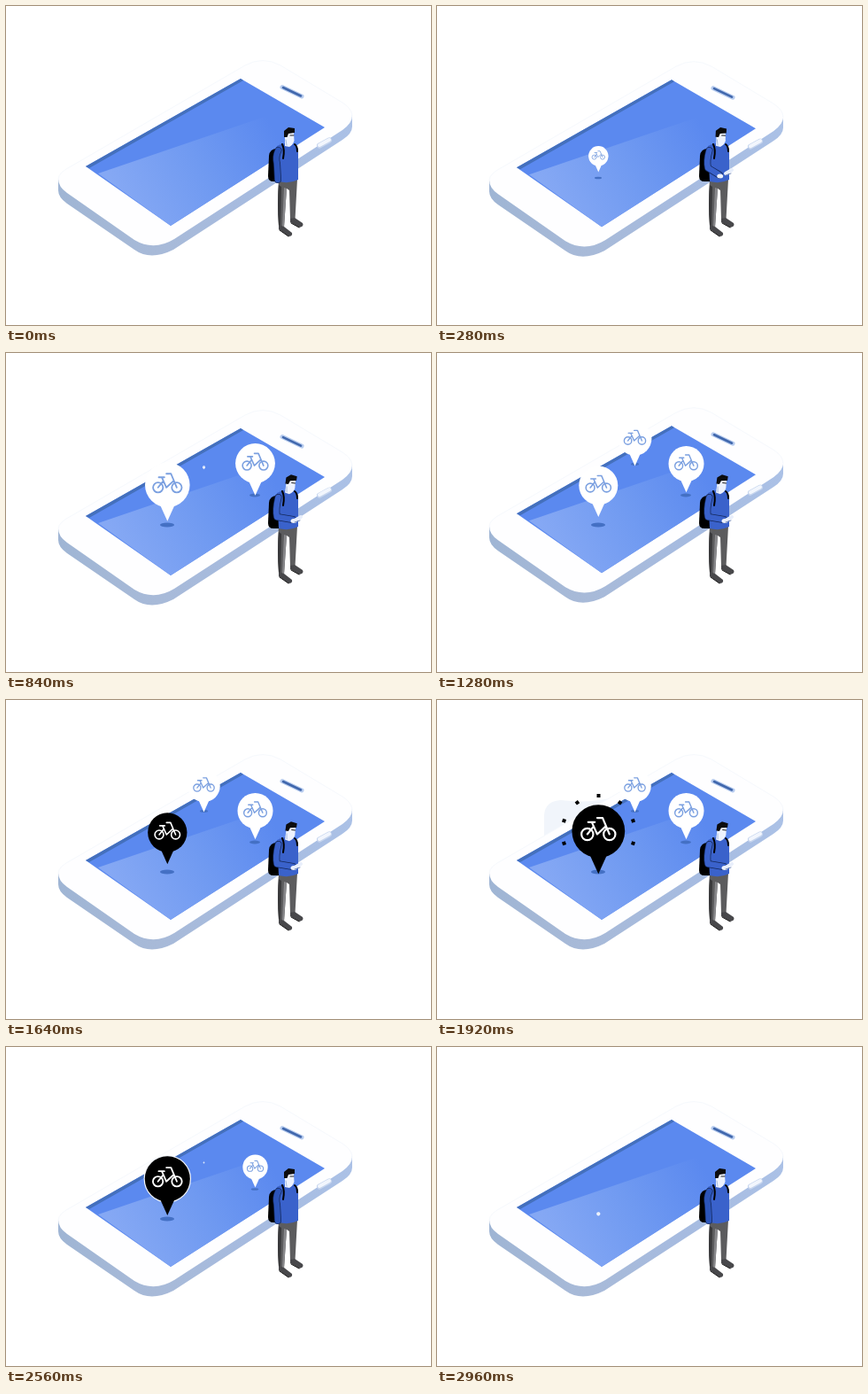
An HTML page with a canvas for the animation above (3 s loop, 480 by 360 pixels).

```html
<!DOCTYPE html>
<html lang="en">
<head>
<meta charset="utf-8">
<title>Bike finder</title>
<style>
html, body { margin: 0; width: 480px; height: 360px; overflow: hidden; background: #fff; }
canvas { display: block; }
</style>
</head>
<body>
<canvas id="stage" width="480" height="360"></canvas>
<script>
const g = document.getElementById('stage').getContext('2d');
const LOOP = 3000;

// Eased value at time t from [time, value] keys.
function key(t, keys) {
  if (t <= keys[0][0]) return keys[0][1];
  for (let i = 1; i < keys.length; i++) {
    const [t0, a] = keys[i - 1], [t1, b] = keys[i];
    if (t < t1) {
      const x = (t - t0) / (t1 - t0);
      return a + (b - a) * x * x * (3 - 2 * x);
    }
  }
  return keys[keys.length - 1][1];
}

function fill(d, color) {
  g.fillStyle = color;
  g.fill(new Path2D(d));
}

function line(d, color, width) {
  g.strokeStyle = color;
  g.lineWidth = width;
  g.stroke(new Path2D(d));
}

function ellipse(x, y, rx, ry, color) {
  g.beginPath();
  g.ellipse(x, y, rx, ry, 0, 0, 7);
  g.fillStyle = color;
  g.fill();
}

function gradient(x0, y0, x1, y1, ...colors) {
  const grad = g.createLinearGradient(x0, y0, x1, y1);
  colors.forEach((c, i) => grad.addColorStop(i / (colors.length - 1), c));
  return grad;
}

function phone(bob) {
  g.save();
  g.translate(0, bob);
  fill('M59 195V208Q59 216 69 223L145 275Q163 288 189 275L380 151Q391 144 391 136V123Z',
    gradient(59, 0, 391, 0, '#9fb5d4', '#a8bad8', '#a6bbe0', '#abc1e6'));
  const face = 'M59 195Q59 188 75 180L270 67Q290 56 310 67L380 109Q402 124 380 140L190 263Q167 277 145 264L69 211Q59 204 59 195Z';
  fill(face, '#fefeff');
  line('M59 195Q59 188 75 180L270 67Q290 56 310 67L380 109Q391 116 391 124', '#f6f9fd', 1);
  fill('M90 181L265 82L360 137L186 248Z', '#5b89ef');
  fill('M104 189L292 125L330 156L186 248Z',
    gradient(135, 225, 300, 135, '#85a8f4', '#709af1', '#5b89ef'));
  fill('M90 181L265 82L268 84L94 183Z', '#4470bd');
  line('M312 91.5L334 102', '#b9cdef', 5);
  line('M313 92L333 101.5', '#4168ad', 2.6);
  line('M354 157.5L365 151.5', '#c6d5ee', 6);
  line('M354 157L365 151', '#f2f6fd', 4);
  g.restore();
}

function bike(color) {
  g.strokeStyle = color;
  g.lineWidth = 1.6;
  for (const x of [-9.2, 9.2]) {
    g.beginPath();
    g.arc(x, 2.5, 4.9, 0, 7);
    g.stroke();
  }
  line('M-9.2 2.5L-4 -4M-5.5 -7.5L-1 2.5L6 -4M-8.5 -7.5H-3M9.2 2.5L3.5 -11H-1', color, 1.6);
}

function pin(x, base, lift, size, s, black, ring) {
  if (s <= 0) return;
  g.save();
  g.translate(x, base - lift * Math.min(s, 1) - 4 * Math.max(0, s - 1));
  g.scale(s * size, s * size);
  const head = new Path2D();
  head.arc(0, 0, 22, 0, 7);
  if (ring) {
    g.strokeStyle = '#f4f7fc';
    g.lineWidth = 2.4 / s;
    g.stroke(head);
  }
  const color = black ? '#000' : '#fff';
  fill('M-7 20L0 35.5L7 20Z', color);
  g.fill(head);
  bike(black ? '#fff' : '#7ba0e0');
  g.restore();
}

function rays(t) {
  if (t < 1760 || t > 2060) return;
  const r = key(t, [[1700, 28], [1920, 41], [2060, 45]]);
  g.fillStyle = '#000';
  for (let i = -3; i <= 3; i++) {
    g.save();
    g.translate(182.5, 149);
    g.rotate(i * Math.PI / 5);
    g.fillRect(-2, -r - 2, 4, 4);
    g.restore();
  }
}

function man(arm) {
  const nod = Math.max(0, arm * 2 - 1);
  const mix = (a, b) => a + (b - a) * arm;
  // legs and shoes
  fill('M308 195H329L326.5 241H321L320 208L317 206L314 250L308 248Q306 222 308 195Z', '#5c5c5e');
  fill('M308 202L311 204L310 249L308 248Q306 224 308 202Z', '#39393b');
  fill('M314 205L317 206L314 249H312Z', '#88888b');
  fill('M308 247L314 249L323 256Q324 260 319 260L308 252Z', '#48484b');
  fill('M321 240L326 239L335 245Q337 249 331 250L321 244Z', '#48484b');
  line('M309 253L319 260M322 245L331 250', '#161616', 1);
  // backpack and torso
  fill('M306 161Q298 161 297 169L296 192Q296 198 302 198H309Z', '#000');
  fill('M306 158Q313 154 320 155Q328 155 330 162V196Q320 201 308 198Z', '#3a62cb');
  line('M312 156Q315 162 313 172M326 156Q329 158 329 164', '#000', 2);
  // arm, hand and handset
  const ex = mix(306, 306), ey = mix(178, 185), hx = mix(307, 324), hy = mix(196, 188);
  const reach = arm > .1;
  const path = `M307.5 163Q${ex - 2} ${ey - 8} ${ex} ${ey}L${hx} ${hy}`;
  line(path, '#14285a', 8);
  line(path, reach ? '#3a62cb' : '#2c55b9', 6.5);
  if (reach) ellipse(hx + 1, hy + 1.5, 3.5, 2.5, '#eef2fc');
  if (arm > .6) {
    line('M326 189L333 185', '#e9effb', 4);
    line('M326 191L332 189', '#7b91bd', 1);
  }
  // head
  g.save();
  g.translate(319, 158);
  g.rotate(nod * .14);
  fill('M-4 -15L6 -15L6.5 -6Q5 -1 1 1L-4 0Z', '#edf2fd');
  fill('M-5 -10V-17L0 -21L7 -20L7 -15L0 -14L-1.5 -10Z', '#0c0c0e');
  line('M2 -12H6', '#222', 1);
  line('M-3 -7L-2 -1', '#a9bce0', 1);
  g.restore();
}

function draw(t) {
  g.fillStyle = '#fff';
  g.fillRect(0, 0, 480, 360);
  g.lineCap = g.lineJoin = 'round';

  g.globalAlpha = key(t, [[1760, 0], [1880, 1], [1960, 1], [2080, 0]]);
  fill('M121 155V130Q122 114 140 113Q170 117 200 110L214 124V155Z', '#f1f5fb');
  g.globalAlpha = 1;

  phone(t < 1400 ? 1.7 * (1 - Math.cos(t / 700 * Math.PI)) : 0);

  const s1 = key(t, [[160, 0], [440, 1.28], [1280, 1], [1620, 1], [1880, 1.37], [2180, 1.16], [2660, 1.16], [3000, 0]]);
  const s2 = key(t, [[440, 0], [700, 1.14], [1280, 1], [2450, 1], [2760, 0]]);
  const s3 = key(t, [[800, 0], [1040, 1.14], [1400, 1], [2300, 1], [2600, 0]]);
  const shadow = (x, y, r, s) => {
    const k = Math.min(s, 1);
    if (k > .3) ellipse(x, y, r * k, r * .32 * k, '#4470c4');
  };
  shadow(182, 194, 8, s1);
  shadow(281, 160.5, 6, s2);
  shadow(223.5, 125.5, 4.5, s3);

  pin(223.5, 132, 35, .83, s3);
  pin(281.5, 161, 36, .91, s2);
  rays(t);
  pin(182.3, 190, 40.5, 1, s1, t > 1640 && t < 2920, t > 2040);

  man(key(t, [[80, 0], [400, 1], [2020, 1], [2320, 0]]));
}

function frame(now) {
  draw(now % LOOP);
  requestAnimationFrame(frame);
}
requestAnimationFrame(frame);
</script>
</body>
</html>
```
